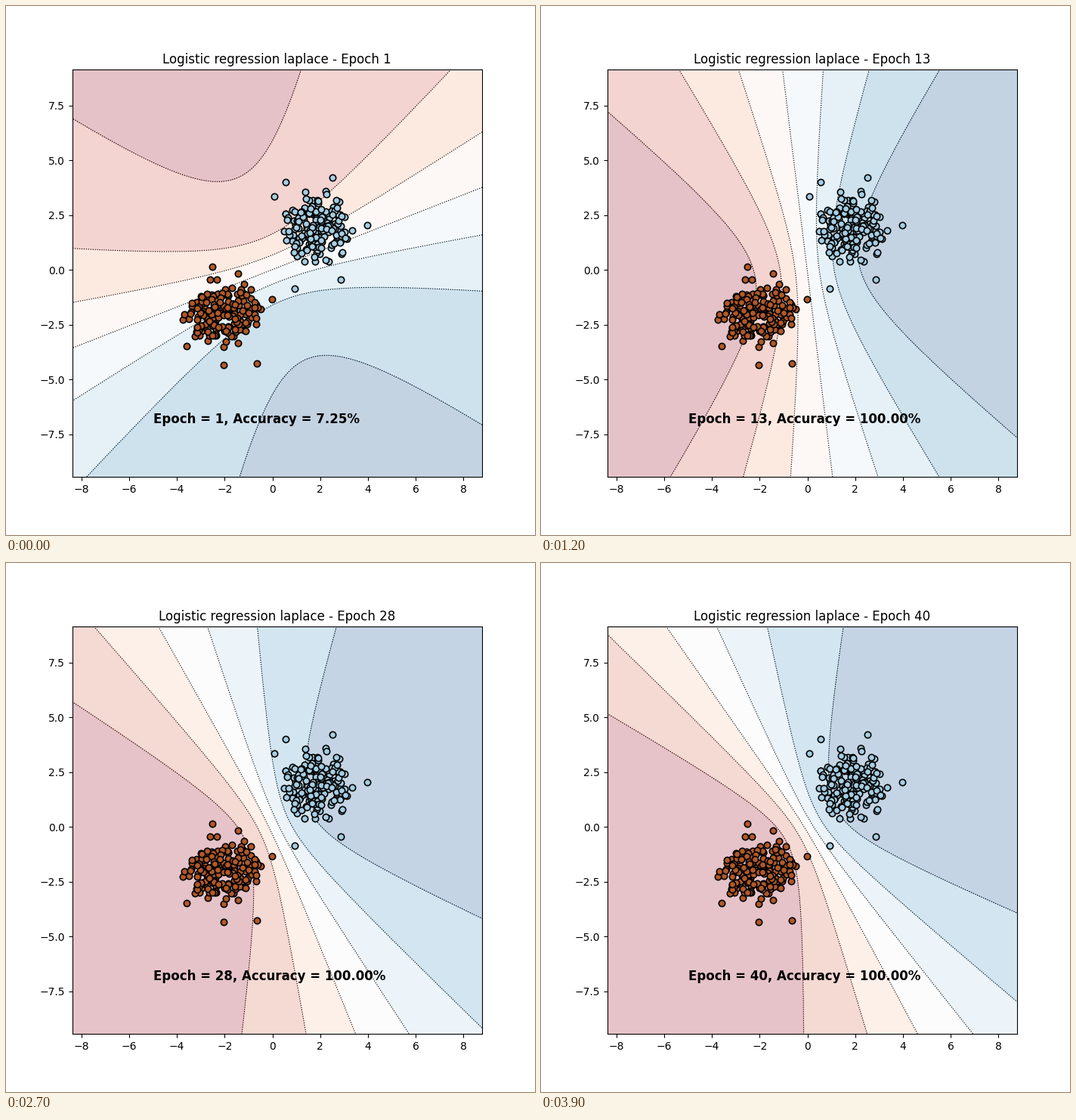
Animation of 700 by 700 pixels, one loop 4 s. Source, as a matplotlib script:

```python
from math import erf, sqrt

import numpy as np
import matplotlib.pyplot as plt
from matplotlib.animation import FuncAnimation

EPOCHS = 40
SAMPLES = 200
BIAS = 0.01
XLIM, YLIM = (-8.385, 8.775), (-9.44, 9.145)

# Posterior at key epochs: both weights, then the variance terms xx, xy, yy
POSTERIOR = {
    1: (0.270, -0.632, 0.140, -0.060, 0.178),
    9: (0.707, -0.220, 0.187, -0.095, 0.142),
    13: (0.816, 0.092, 0.147, -0.027, 0.130),
    19: (1.054, 0.333, 0.131, -0.089, 0.169),
    24: (1.291, 0.509, 0.128, -0.033, 0.198),
    33: (1.490, 0.739, 0.200, -0.084, 0.213),
    40: (1.525, 0.862, 0.177, -0.065, 0.251),
}

rng = np.random.default_rng(7)
X, Y = np.meshgrid(np.linspace(*XLIM, 160), np.linspace(*YLIM, 160))


def cluster(centre, spread, reach, strays):
    """A normal cloud cut off at `reach` deviations, plus a few strays."""
    cloud = rng.normal(size=(4 * SAMPLES, 2))
    cloud = cloud[np.hypot(*cloud.T) < reach][:SAMPLES - len(strays)]
    return np.vstack([cloud * spread + centre, strays]).T


def probability(epoch):
    """Logistic output damped by the variance of the weights."""
    w1, w2, xx, xy, yy = (np.interp(epoch, list(POSTERIOR), values)
                          for values in zip(*POSTERIOR.values()))
    damping = np.sqrt(1 + xx * X**2 + xy * X * Y + yy * Y**2)
    return 1 / (1 + np.exp(-(w1 * X + w2 * Y + BIAS) / damping))


def accuracy(epoch):
    """Share of samples on the right side, following a normal curve."""
    margin = -1.457 + 0.394 * (epoch - 1)
    hits = round(SAMPLES * (1 + erf(margin / sqrt(2))))
    return 100 * hits / (2 * SAMPLES)


def contour_levels(epoch):
    """Levels widen once the probabilities span more than 0.8."""
    return np.arange(1, 10) * 0.1 if epoch < 17 else np.arange(8) * 0.15


fig, ax = plt.subplots(figsize=(7, 7), dpi=100)
ax.set(xlim=XLIM, ylim=YLIM)

blue = cluster((1.87, 1.97), (0.75, 0.8), 2.2,
               [(0.94, -0.85), (2.5, 4.2), (0.55, 4.0), (3.98, 2.05),
                (2.87, -0.43), (0.08, 3.34)])
brown = cluster((-2.13, -1.95), (0.8, 0.75), 2.1,
                [(-2.05, -4.32), (-0.65, -4.28), (-2.53, 0.15),
                 (-0.03, -1.33), (-1.43, -0.17), (-3.58, -3.48)])
for sample, color in ((blue, "#a6cee3"), (brown, "#b15928")):
    ax.scatter(*sample, c=color, edgecolors="k", linewidths=1.2, zorder=3)

title = ax.set_title("")
label = ax.text(-5, -7, "", fontsize=12, fontweight="bold", zorder=4)
contours = []


def draw(frame):
    epoch = frame + 1
    while contours:
        contours.pop().remove()
    p, levels = probability(epoch), contour_levels(epoch)
    contours.append(ax.contourf(X, Y, p, levels, cmap="RdBu", alpha=0.25))
    contours.append(ax.contour(X, Y, p, levels[1:-1], colors="k",
                               linestyles=":", linewidths=0.8))
    title.set_text(f"Logistic regression laplace - Epoch {epoch}")
    label.set_text(f"Epoch = {epoch}, Accuracy = {accuracy(epoch):.2f}%")
    return contours + [title, label]


anim = FuncAnimation(fig, draw, frames=EPOCHS, interval=100, repeat=True)
plt.show()
```
